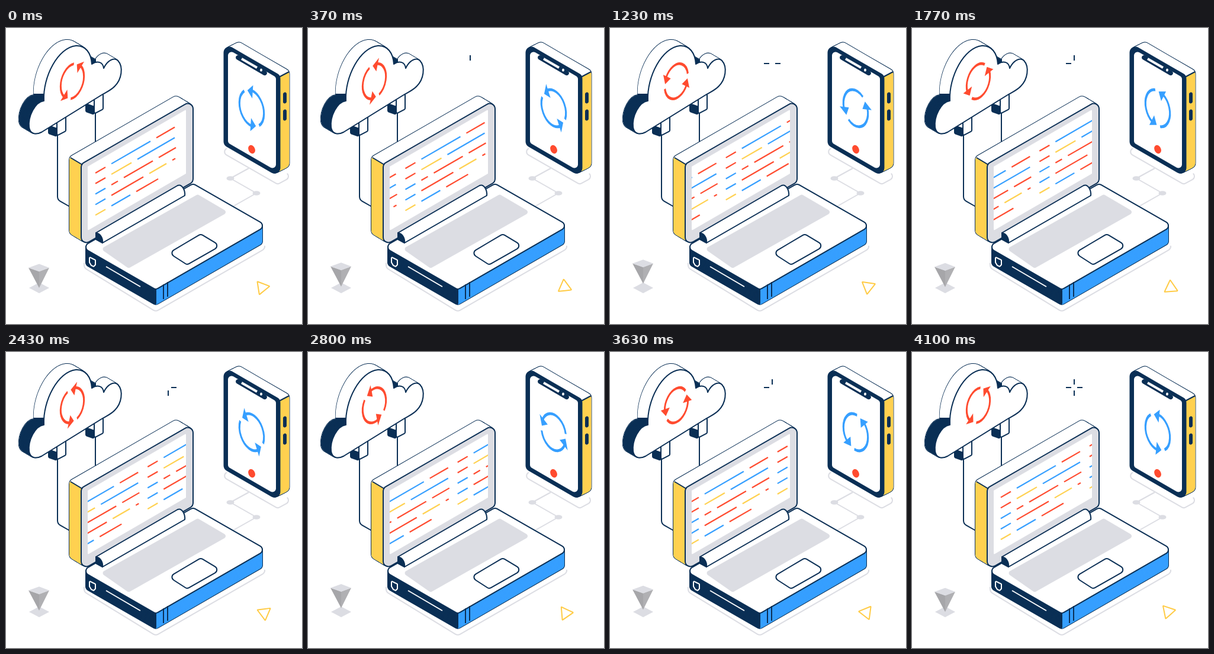
These frames come from a looping animation (500 by 500 pixels, 4.13 s). An HTML page with a canvas:

```html
<!DOCTYPE html>
<html lang="en">
<head>
<meta charset="utf-8">
<title>Device sync</title>
<style>
  html, body { margin: 0; width: 100%; height: 100%; overflow: hidden; background: #fff; }
  canvas { display: block; width: 500px; height: 500px; }
</style>
</head>
<body>
<canvas id="stage" width="500" height="500"></canvas>
<script>
const ctx = document.getElementById('stage').getContext('2d');
const LOOP = 4130, TAU = Math.PI * 2, RAD = Math.PI / 180;
const NAVY = '#0a2f55', BLUE = '#369fff', RED = '#ff4b2f', YELLOW = '#ffd150',
      GRAY = '#dcdde3', WHITE = '#fff';

function paint(path, fill, stroke, width = 2) {
  if (fill) { ctx.fillStyle = fill; ctx.fill(path); }
  if (stroke) { ctx.strokeStyle = stroke; ctx.lineWidth = width; ctx.stroke(path); }
}

// Closed polygon with rounded corners; pts is a flat x, y list.
function rounded(pts, radius) {
  const n = pts.length / 2, path = new Path2D();
  const at = i => [pts[(i % n) * 2], pts[(i % n) * 2 + 1]];
  const [x0, y0] = at(0), [x1, y1] = at(1);
  path.moveTo((x0 + x1) / 2, (y0 + y1) / 2);
  for (let i = 1; i <= n; i++) path.arcTo(...at(i), ...at(i + 1), radius);
  path.closePath();
  return path;
}

// Isometric panel: a parallelogram from a corner and its two edges.
function panel(x, y, ax, ay, bx, by, radius) {
  return rounded([x, y, x + ax, y + ay, x + ax + bx, y + ay + by, x + bx, y + by], radius);
}

function line(pts, color, width = 2, radius = 0) {
  const last = pts.length - 2, path = new Path2D();
  path.moveTo(pts[0], pts[1]);
  for (let i = 2; i < last; i += 2) path.arcTo(pts[i], pts[i + 1], pts[i + 2], pts[i + 3], radius);
  path.lineTo(pts[last], pts[last + 1]);
  paint(path, null, color, width);
}

function oval(x, y, rx, ry, turn, fill) {
  const path = new Path2D();
  path.ellipse(x, y, rx, ry, turn * RAD, 0, TAU);
  paint(path, fill);
}

// Extrudes a face by (dx, dy); the part inside region gets its own color.
function slab(face, dx, dy, front, side, region, regionColor) {
  const sweep = (fill, stroke) => {
    for (let k = 1; k >= 0; k -= 0.04) {
      ctx.save();
      ctx.translate(dx * k, dy * k);
      paint(face, fill, stroke);
      ctx.restore();
    }
  };
  sweep(NAVY, NAVY);
  sweep(side);
  ctx.save();
  ctx.clip(region);
  sweep(regionColor);
  ctx.restore();
  paint(face, front, NAVY);
}

// Two circling arrows on a wall; slope is the wall's direction.
function syncIcon(x, y, slope, scale, angle, color) {
  const arc = new Path2D(), head = new Path2D(), tip = -26 * RAD;
  arc.arc(0, 0, 30, -4 * RAD, 138 * RAD);
  head.moveTo(40, 0);
  head.lineTo(17, 0);
  head.lineTo(29 * Math.cos(tip), 29 * Math.sin(tip));
  ctx.save();
  ctx.transform(0.69 * scale, slope * scale, 0, scale, x, y);
  ctx.rotate(angle * RAD);
  for (let i = 0; i < 2; i++) {
    paint(arc, null, color, 4.6);
    paint(head, color);
    ctx.rotate(Math.PI);
  }
  ctx.restore();
}

function plug(x, y) {
  paint(panel(x, y, 14, 5, 0, 13, 2), NAVY, NAVY);
  paint(panel(x + 14, y - 10, 15, -8, 0, 27, 2), WHITE, NAVY);
}

function cloud(angle) {
  line([87, 180, 87, 290, 108, 302], NAVY, 2, 9);
  line([151, 144, 151, 192], NAVY);
  plug(72, 165);
  plug(135, 128);
  const face = new Path2D('M64 123C62 82 88 33 118 30C134 29 144 42 145 61C155 54 164 58 165 68' +
    'C171 55 182 49 189 55C199 66 195 87 184 98C178 105 168 109 160 114' +
    'L60 176C50 181 41 179 39 168C37 149 49 125 64 123Z');
  const dark = new Path2D('M0 111H66V190H0ZM143 40H152V64H143Z');
  slab(face, -17, -10, WHITE, WHITE, dark, NAVY);
  syncIcon(112, 90, -0.3, 0.95, -40 - angle, RED);
}

function phone(angle) {
  line([410, 237, 379, 254, 423, 279, 384, 301], GRAY);
  oval(379, 254, 6.5, 3.8, 0, GRAY);
  oval(423, 279, 6.5, 3.8, 0, GRAY);
  line([372, 204, 363, 209, 459, 264, 481, 252, 476, 247], GRAY, 2, 6);

  slab(panel(368.5, 26, 94, 54.5, 0, 171, 9), 16, -8, NAVY, WHITE,
       new Path2D('M459 84L490 68V270H440Z'), YELLOW);
  line([461, 83, 478, 74], NAVY);
  paint(panel(375, 36, 81, 47, 0, 158, 6), WHITE);
  paint(panel(388, 43, 53, 31, 0, 9, 4), NAVY);
  line([398, 52, 424, 67], WHITE, 4);
  oval(431, 71, 2, 2.6, 0, WHITE);
  for (const y of [110, 139]) paint(panel(468, y, 6, -3, 0, 19, 2.5), NAVY);
  oval(415, 205, 5.5, 7.5, -25, RED);
  syncIcon(415, 135.5, 0.3, 1, -85 - angle, BLUE);
}

// Dashes of each row: color letter and length, separated by an even gap.
const INK = { r: RED, b: BLUE, y: YELLOW };
const ROWS = ['r17 b66 r31', 'r17 y34 b63', 'b17 r11 r49 r29', 'b17 r54 y29 r5', 'y17 b32 r37'];
const GAP = 10, PERIOD = 150;

function codeLines(shift) {
  const screen = panel(138, 234, 166, -96, 0, 108, 1);
  paint(screen, WHITE);
  ctx.save();
  ctx.clip(screen);
  ROWS.forEach((row, r) => {
    const y = x => 252.5 + r * 17.8 - (x - 138) * 0.578;
    for (const first of [151, 151 - PERIOD]) {
      let x = first + shift;
      for (const dash of row.split(' ')) {
        const end = x + Number(dash.slice(1));
        line([x, y(x), end, y(end)], INK[dash[0]], 2.2);
        x = end + GAP;
      }
    }
  });
  ctx.restore();
}

function laptop(p) {
  line([132, 397, 132, 405, 253, 479, 437, 373, 437, 371], GRAY, 2, 8);

  // base
  const top = rounded([128, 370, 316, 263, 440, 334, 253, 442], 7);
  slab(top, 0, 26, WHITE, NAVY, new Path2D('M253 300H450V480H253Z'), BLUE);
  line([253, 440, 253, 466], NAVY);
  for (const x of [266, 273]) line([x, 586 - x * 0.575, x, 611 - x * 0.575], NAVY);
  paint(rounded([160, 373, 324, 281, 375, 311, 207, 406], 4), GRAY);
  paint(rounded([275, 380, 329, 348, 362, 368, 306, 400], 6), WHITE, NAVY);
  line([169, 403, 227, 437], WHITE);
  paint(rounded([141, 387, 151, 392, 151, 400, 148, 403, 144, 401, 141, 396], 1), null, WHITE);

  // lid
  slab(panel(127, 230, 189, -109, 0, 139, 9), -20, -12, GRAY, WHITE,
       new Path2D('M100 214L130 232V380H100Z'), YELLOW);
  line([109, 219, 129, 231], NAVY);
  codeLines(p * PERIOD);

  // hinge
  paint(new Path2D('M152 346L290 266C297 263 303 274 302 283L163 363Z'), WHITE, NAVY);
  paint(new Path2D('M152 346C159 347 164 355 163 363L152 357Z'), NAVY, NAVY);
}

function crystal(p) {
  const lift = 8 * Math.sin(TAU * p) ** 2;
  paint(panel(39, 439, 17, -9, 17, 9, 0), GRAY);
  ctx.save();
  ctx.translate(56, 405 - lift);
  paint(new Path2D('M-18 0L0 6V34Z'), '#a6a6a9');
  paint(new Path2D('M17 0L0 6V34Z'), '#b0b0b3');
  paint(new Path2D('M-18 0L0 -6.5L17 0L0 6.5Z'), GRAY);
  ctx.restore();
}

function triangle(angle) {
  const drift = (196 + angle) * RAD, pts = [];
  for (let i = 0; i < 3; i++) {
    const a = (-9 + angle + i * 120) * RAD;
    pts.push(434.8 + 2.3 * Math.cos(drift) + 13 * Math.cos(a),
             438.9 + 2.3 * Math.sin(drift) + 13 * Math.sin(a));
  }
  paint(rounded(pts, 0.5), null, '#ffcb45');
}

// Blink pattern of the right, bottom, left and top tick, one digit per beat.
const BLINK = ['00101001', '00001001', '00110011', '01010011'];

function crosshair(t) {
  const beat = Math.floor((t + 440) / 590);
  BLINK.forEach((pattern, i) => {
    if (pattern[beat] !== '1') return;
    const dx = Math.cos(i * TAU / 4), dy = Math.sin(i * TAU / 4);
    line([274 + 5 * dx, 60 + 5 * dy, 274 + 14 * dx, 60 + 14 * dy], NAVY);
  });
}

function draw(t) {
  const p = t / LOOP, angle = 360 * p;
  ctx.fillStyle = WHITE;
  ctx.fillRect(0, 0, 500, 500);
  ctx.lineJoin = 'round';
  cloud(angle);
  phone(angle);
  laptop(p);
  crystal(p);
  triangle(angle);
  crosshair(t);
}

const start = performance.now();
function tick() {
  draw((performance.now() - start) % LOOP);
  requestAnimationFrame(tick);
}
tick();
</script>
</body>
</html>
```
